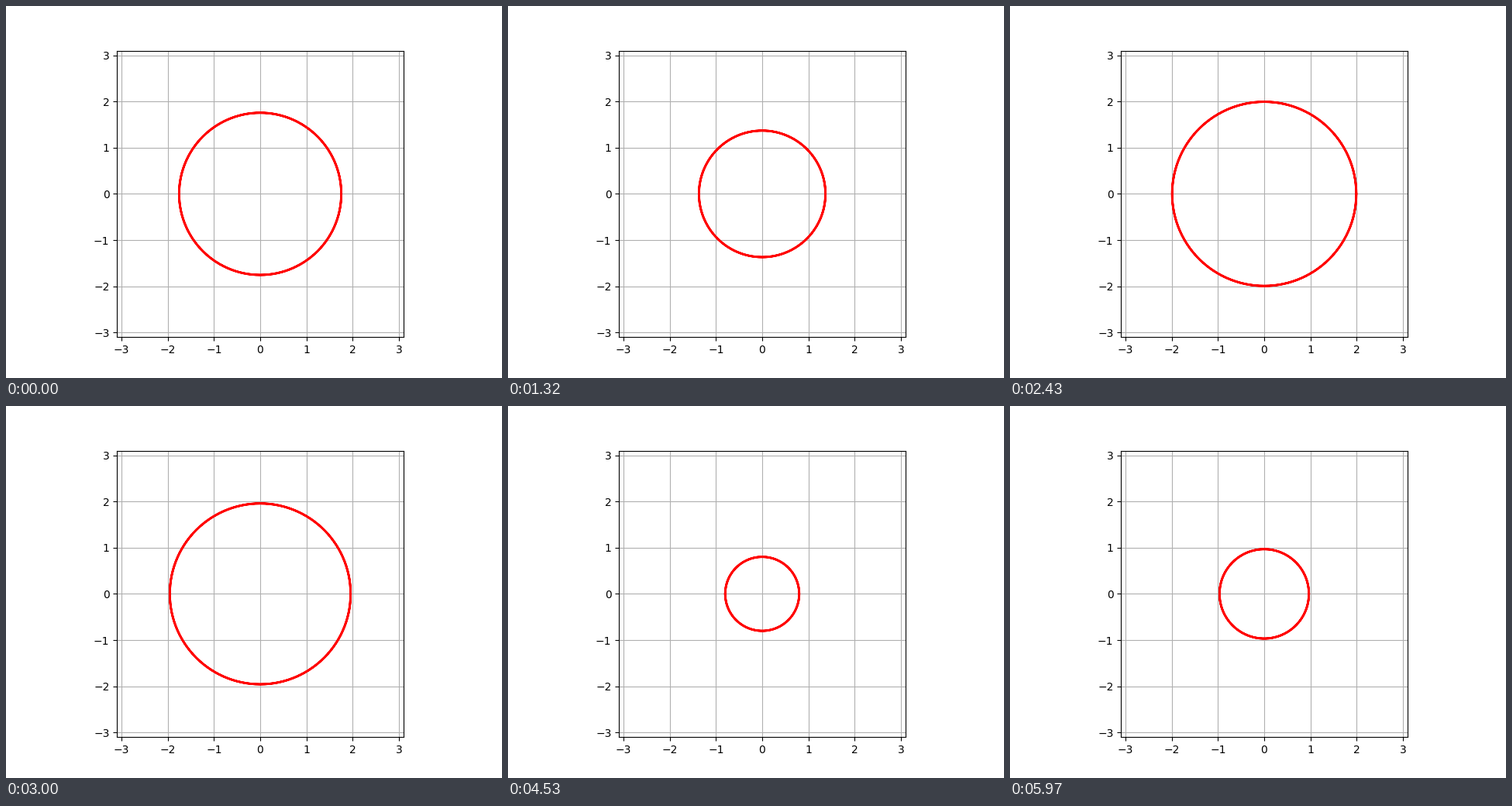
A matplotlib script that plays this animation: 640 px wide and 480 px high, repeating every 6000 ms.

```python
import numpy as np
import matplotlib.pyplot as plt
from matplotlib.animation import FuncAnimation

FRAMES = 200
INTERVAL = 30
LIMIT = 3.1

fig, ax = plt.subplots(figsize=(6.4, 4.8), dpi=100)
ax.set_aspect("equal")
ax.set_xlim(-LIMIT, LIMIT)
ax.set_ylim(-LIMIT, LIMIT)
ax.set_xticks(range(-3, 4))
ax.set_yticks(range(-3, 4))
ax.grid(True)

# Two turns of the circle give the stroke a crisper edge.
theta = np.linspace(0, 4 * np.pi, 721)
ring, = ax.plot([], [], color="red", lw=2)


def update(i):
    radius = 2 * np.cos(0.15 * i + 0.5)
    ring.set_data(radius * np.cos(theta), radius * np.sin(theta))
    return ring,


anim = FuncAnimation(fig, update, frames=FRAMES, interval=INTERVAL,
                     repeat=True, repeat_delay=0)
plt.show()
```
